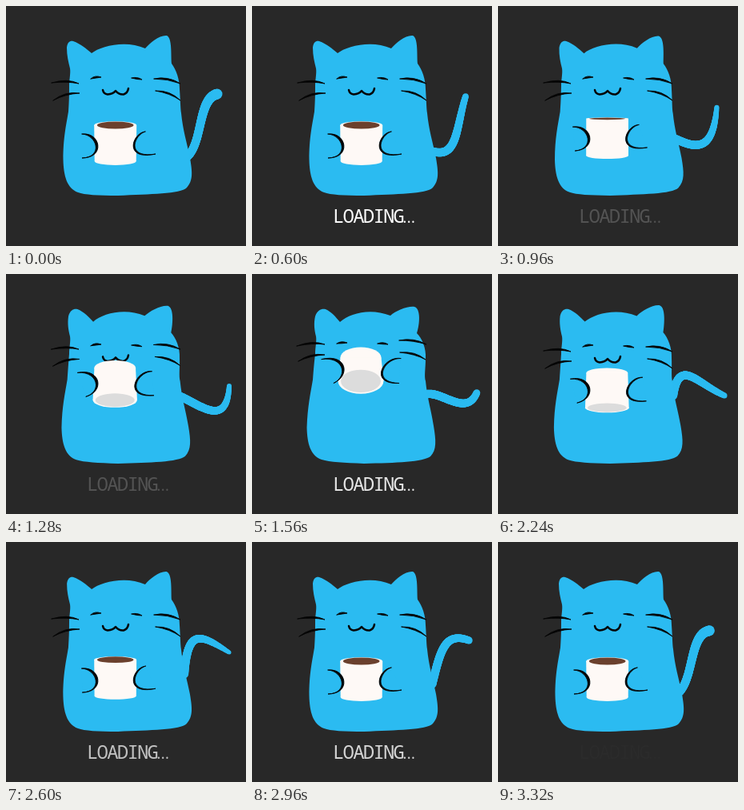
These frames come from a looping animation (300 by 300 pixels, 3360 ms). An HTML page with a canvas:

```html
<!DOCTYPE html>
<html lang="en">
<head>
<meta charset="utf-8">
<title>Loading cat</title>
<style>
html, body { margin: 0; width: 100%; height: 100%; overflow: hidden; background: #282828; }
canvas { display: block; width: 100vw; height: 100vh; }
</style>
</head>
<body>
<canvas id="stage" width="300" height="300"></canvas>
<script>
const LOOP = 3360, STEP = 40;
const BLUE = '#2bbbf1', INK = '#050505';
const ctx = document.getElementById('stage').getContext('2d');

// Each shape is a pair of matching paths: cup resting, cup at the mouth.
const BODY = [
  'M107 59 C118 50 150 42 174 53 C180 46 192 36 201 37 C208 40 206 62 207 72 C213 80 217 92 217 104 C218 118 218 128 219 134 C221 155 226 170 230 190 C233 208 234 218 226 227 C218 235 180 235 140 237 C115 237 98 236 90 233 C76 228 72 212 71.5 192 C71.5 165 75 150 78 132 C79 118 79 108 79 100 C79 92 81 84 80 78 C78 70 76 62 76 52 C77 44 81 43 84 44 C93 47 101 54 107 59 Z',
  'M110 60 C122 49 148 42 173 52 C180 46 194 40 203 41 C211 43 210 62 206 74 C212 80 218 92 217 106 C217 118 215 128 217 134 C219 155 224 170 227 190 C230 208 231 220 223 228 C214 235 180 236 140 237 C115 236 97 235 87 232 C73 227 69 212 68.5 192 C69.5 165 73 150 76 132 C77 118 78 108 79 100 C79 92 81 84 80 78 C78 70 77 62 79 53 C82 44 88 43 92 44 C99 47 105 54 110 60 Z'
];
const MOUTH = [
  'M121 105 Q122 110 127 110.5 Q134 110 137 106 Q141 111 147 110.5 Q152 109 153 103',
  'M121 100 Q122 105 127 105.5 Q134 105 137 101 Q141 106 147 105.5 Q152 104 153 98'
];
// Eyes and whiskers: out along one edge, back along the other.
const HAIRS = [
  'M106 91 Q111 86 119 89 Q113 90 106 91 M157 90 Q164 88 170 92 Q164 92 157 90' +
  'M57 96 Q77 90 91 97 Q77 94 57 96 M59 118 Q74 106 92 109 Q74 110 59 118' +
  'M185 91 Q202 87 218 97 Q202 91 185 91 M187 106 Q205 105 218 118 Q205 109 187 106',
  'M106 87 Q111 83 119 86 Q113 87 106 87 M157 87 Q164 84 170 88 Q164 88 157 87' +
  'M56 90 Q76 82 91 88 Q76 86 56 90 M58 109 Q73 98 91 101 Q73 102 58 109' +
  'M184 83 Q202 79 218 88 Q202 83 184 83 M185 98 Q204 96 217 107 Q204 100 185 98'
];
const PAWS = [
  [
    'M95 160 C118 157 125 190 95 190 C122 189 114 161 95 160',
    'M87 106 C118 98 124 126 102 136 C121 126 114 102 87 106'
  ],
  [
    'M174 157 C158 158 146 194 187 185 C149 191 160 161 174 157',
    'M186 105 C164 101 145 138 184 136 C148 135 166 104 186 105'
  ]
];

// Tail: time, four curve points, tip radius.
const TAIL = [
  [0, 227, 188, 246, 170, 240, 116, 264, 110, 6.5],
  [600, 227, 182, 257, 190, 255, 152, 267, 113, 3.8],
  [1280, 218, 153, 242, 163, 276, 194, 279, 140, 3],
  [1920, 216, 152, 230, 118, 250, 150, 282, 156, 6],
  [2240, 219, 152, 226, 104, 248, 136, 283, 152, 3.5],
  [2600, 223, 165, 227, 106, 244, 116, 279, 138, 2.5]
];

const lerp = (a, b, k) => a + (b - a) * k;
const clamp = x => Math.min(1, Math.max(0, x));
const ease = x => (x = clamp(x)) * x * (3 - 2 * x);

function blend([from, to], k) {
  const ends = to.match(/[\d.]+/g);
  let i = 0;
  return from.replace(/[\d.]+/g, n => lerp(+n, +ends[i++], k).toFixed(2));
}

// Smooth looping interpolation through the tail poses.
function tailPose(t) {
  const n = TAIL.length;
  const key = i => {
    const pose = TAIL[(i + n) % n].slice();
    pose[0] += Math.floor(i / n) * LOOP;
    return pose;
  };
  let i = n - 1;
  while (TAIL[i][0] > t) i--;
  const [a, b, c, d] = [key(i - 1), key(i), key(i + 1), key(i + 2)];
  const span = c[0] - b[0], u = (t - b[0]) / span;
  const w = ease(u);
  return b.map((v, j) => {
    const m0 = (c[j] - a[j]) / (c[0] - a[0]) * span;
    const m1 = (d[j] - v) / (d[0] - b[0]) * span;
    return lerp(v, c[j], w) + u * (1 - u) * ((1 - u) * m0 - u * m1);
  }).slice(1);
}

function ellipse(x, y, rx, ry, color) {
  ctx.fillStyle = color;
  ctx.beginPath();
  ctx.ellipse(x, y, rx, ry, 0, 0, 7);
  ctx.fill();
}

function fill(d, color) {
  ctx.fillStyle = color;
  ctx.fill(new Path2D(d));
}

function line(d, width) {
  ctx.lineWidth = width;
  ctx.strokeStyle = INK;
  ctx.stroke(new Path2D(d));
}

// Brush stroke with thin ends.
function brush(d) {
  fill(d, INK);
  line(d, 0.9);
}

function drawTail(t) {
  const p = tailPose(t), tip = p[8];
  const at = (j, s) => {
    const r = 1 - s;
    return r * r * r * p[j] + 3 * r * r * s * p[j + 2] + 3 * r * s * s * p[j + 4] + s * s * s * p[j + 6];
  };
  for (let s = 0; s <= 1; s += 1 / 128) {
    const r = lerp(5.2, tip, s * s * s);
    ellipse(at(0, s), at(1, s), r, r, BLUE);
  }
}

function drawCup(p) {
  const white = '#fef9f6';
  const x = lerp(136.7, 136, p);
  const top = 149 - 50 * p + 5 * p * p, base = 194 - 38 * p - 23 * p * p;
  const tilt = -5 + 21 * p, depth = Math.abs(tilt);
  const rTop = lerp(26.5, 25.5, p), rBase = lerp(26, 28.5, p);
  ellipse(x, top, rTop, Math.min(depth, 13), white);
  ellipse(x, base, rBase, Math.max(depth, 4), white);
  ctx.beginPath();
  ctx.moveTo(x - rTop, top);
  ctx.lineTo(x + rTop, top);
  ctx.lineTo(x + rBase, base);
  ctx.lineTo(x - rBase, base);
  ctx.fill();
  if (tilt < 0) ellipse(x, top, 22.8, depth * 0.92, '#6b402d');
  else ellipse(x, base, lerp(23.5, 25, p), depth * 0.9, '#dcdcdc');
}

function drawText(t) {
  const mono = '"Noto Sans Mono", "DejaVu Sans Mono", monospace';
  ctx.globalAlpha = ease(1 - Math.abs(1 - (t % 1120) / 560));
  ctx.fillStyle = '#fff';
  ctx.font = '24px ' + mono;
  ctx.letterSpacing = '-1.8px';
  ctx.fillText('LOADING', 101, 270.5);
  ctx.font = '18px ' + mono;
  ctx.letterSpacing = '-5.6px';
  ctx.fillText('...', 185.6, 270.5);
  ctx.globalAlpha = 1;
}

function draw(now) {
  const t = Math.floor(now % LOOP / STEP) * STEP;
  const lift = ease((t - 733) / 880) - ease((t - 1820) / 880);
  const nod = clamp((lift - 0.55) / 0.4);

  ctx.fillStyle = '#282828';
  ctx.fillRect(0, 0, 300, 300);
  ctx.lineCap = ctx.lineJoin = 'round';
  drawTail(t);
  fill(blend(BODY, lift), BLUE);
  line(blend(MOUTH, nod), 2.5);
  brush(blend(HAIRS, nod));
  drawCup(lift);
  for (const paw of PAWS) {
    const d = blend(paw, lift);
    fill(d.slice(0, d.lastIndexOf('C')), BLUE);
    brush(d);
  }
  drawText(t);
}

const start = performance.now();
function tick() {
  draw(performance.now() - start);
  requestAnimationFrame(tick);
}
tick();
</script>
</body>
</html>
```
